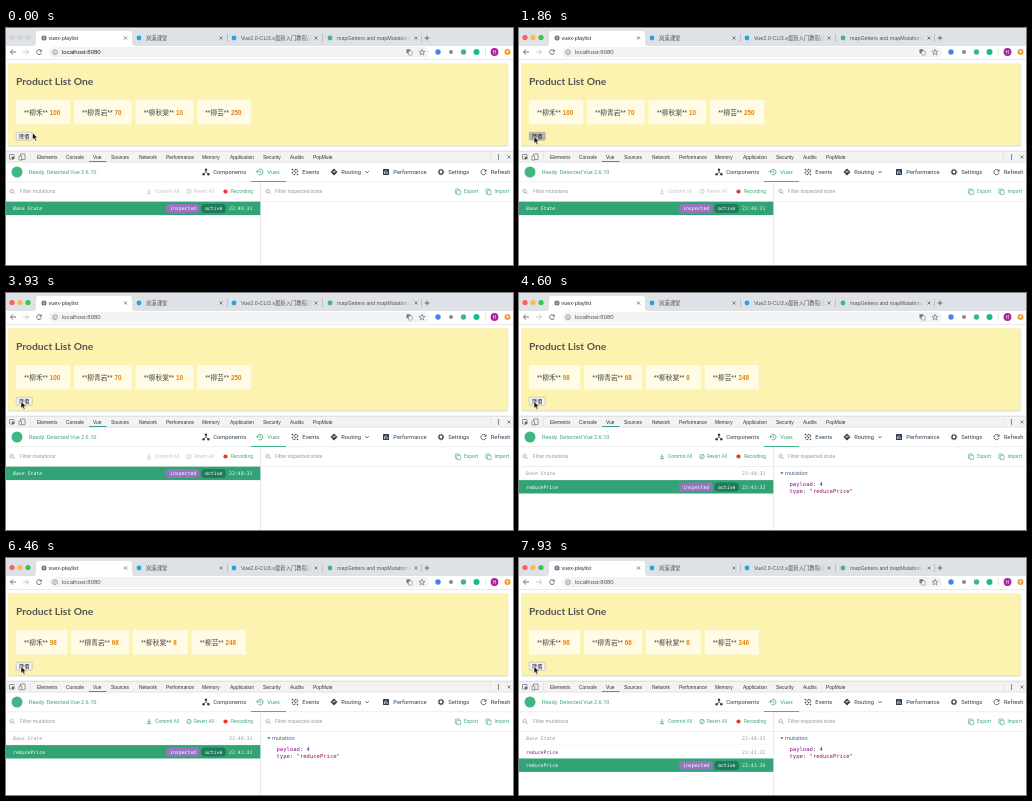
These frames come from a looping animation (507x237 px, 8 s). An HTML page:

```html
<!DOCTYPE html>
<html lang="en">
<head>
<meta charset="utf-8">
<title>Product list</title>
<style>
html, body { margin: 0; width: 100%; height: 100%; overflow: hidden; background: #fff; }
svg { display: block; width: 100%; height: 100%; }
text { white-space: pre; }
.ui { font-family: "Liberation Sans", "Noto Sans CJK SC", sans-serif; }
.dev { font-family: Roboto, sans-serif; }
.mono { font-family: "DejaVu Sans Mono", monospace; }
.head { font-family: Lato, sans-serif; font-weight: 700; }
</style>
</head>
<body>
<svg id="stage" viewBox="0 0 507 237" preserveAspectRatio="none">
  <defs>
    <linearGradient id="fade"><stop stop-color="#dee1e6" stop-opacity="0"/><stop offset="1" stop-color="#dee1e6"/></linearGradient>
    <filter id="shadow" x="-5%" y="-10%" width="110%" height="125%">
      <feDropShadow dx=".4" dy=".8" stdDeviation=".7" flood-opacity=".3"/>
    </filter>
  </defs>
  <g id="chrome"></g>
  <g id="page"></g>
  <g id="tools"></g>
  <g id="state"></g>
  <g id="button"></g>
  <path id="arrow" d="M0 0V7L1.6 5.5L2.8 8.2L4.1 7.6L2.9 5H5.1Z" fill="#111" stroke="#fff" stroke-width=".6"/>
  <path id="hand" d="M-.8 0Q0-.8.8 0V2.8L4 3.6Q4.8 4 4.5 5.2L3.8 7.8H-.7L-3 4.8Q-2.5 3.8-.8 5Z" fill="#fff" stroke="#111" stroke-width=".7"/>
</svg>
<script>
const $ = id => document.getElementById(id);
const GREEN = '#3ba776', INK = '#2c3e50', GREY = '#999';
const LOOP = 8000, COMMITS = [4000, 7670], PRESSES = [[1820, 1930], [5600, 5720]];
const PEOPLE = [['柳禾', 100], ['柳青岩', 70], ['柳秋棠', 10], ['柳芸', 250]];
const STAMPS = ['22:40:31', '22:41:32', '22:41:36'];

const text = (x, y, s, size, fill, cls = 'ui', more = '') =>
  `<text x="${x}" y="${y}" font-size="${size}" fill="${fill}" class="${cls}" ${more}>${s}</text>`;
const rect = (x, y, w, h, fill, r = 0, more = '') =>
  `<rect x="${x}" y="${y}" width="${w}" height="${h}" rx="${r}" fill="${fill}" ${more}/>`;
const dot = (x, y, r, fill, more = '') => `<circle cx="${x}" cy="${y}" r="${r}" fill="${fill}" ${more}/>`;
const line = (d, stroke, w = .7, x = 0, y = 0) =>
  `<path d="${d}" transform="translate(${x} ${y})" fill="none" stroke="${stroke}" stroke-width="${w}"/>`;
const cross = (x, y, r = 1.5) => line(`M${-r} ${-r}L${r} ${r}M${r} ${-r}L${-r} ${r}`, '#555', .7, x, y);
const dots = (x, y, fill) => [-2, 0, 2].map(d => dot(x, y + d, .65, fill)).join('');
const reload = (x, y, c, r = 2.4) =>
  line(`M${r * .8} ${-r * .6}A${r} ${r} 0 1 0 ${r} ${r * .3}M${r} ${-r}V${-r * .3}H${r * .3}`, c, .8, x, y);
const search = (x, y) => dot(x - .4, y - .4, 1.6, 'none', 'stroke="#888" stroke-width=".6"') + line('M.8 .8L2.5 2.5', '#888', .7, x, y);

// The window controls are pale until the window gets its first click.
function chrome(active) {
  const tabs = [[140, '岚溪课堂', 215], [235, 'Vue2.0-CLI3.x最新入门教程(基础)', 310], [331, 'mapGetters and mapMutations', 408]];
  const lights = active ? ['#fc605c', '#fdbc40', '#34c749'] : Array(3).fill('#d3d5d9');
  let s = rect(0, 0, 507, 18, '#dee1e6') + rect(0, 18, 507, 14, '#fff');
  lights.forEach((c, i) => s += dot(6 + 8 * i, 9.5, 2.6, c));
  s += '<path d="M27 18Q30 18 30 15V6Q30 3 33 3H123Q126 3 126 6V15Q126 18 129 18Z" fill="#fff"/>';
  s += dot(38, 10, 2.5, '#555') + line('M-2.4 0H2.4M0-2.4Q-2 0 0 2.4M0-2.4Q2 0 0 2.4', '#fff', .4, 38, 10);
  s += text(42.5, 12, 'vuex-playlist', 5.4, '#333') + cross(119.5, 10);
  tabs.forEach(([x, title, end], i) => {
    s += dot(x - 7, 10, 2.4, i < 2 ? '#25a4dd' : '#41b883');
    s += `<svg x="${x}" y="0" width="${end - x - 4 + (i > 1 ? 5 : 0)}" height="18">${text(0, 12, title, 5.35, '#555')}</svg>`;
    s += rect(end - 13, 4, 9, 11, i ? 'url(#fade)' : 'none');
    if (i < 2) s += cross(end, 10) + rect(end + 6.5, 6, .5, 8, '#9aa0a6');
  });
  s += rect(408, 4, 6, 11, '#dee1e6') + cross(410, 10) + rect(415, 6, .5, 8, '#9aa0a6') + line('M-2.4 0H2.4M0-2.4V2.4', '#555', .8, 421, 10);
  s += line('M3 0H-2.5M0-2.6L-2.6 0L0 2.6', '#555', .8, 7, 24) + line('M-3 0H2.5M0-2.6L2.6 0L0 2.6', '#b8bbc0', .8, 20, 24);
  s += reload(33, 24, '#555') + rect(43, 19, 380, 10.5, '#f1f3f4', 5.2);
  s += dot(49, 24.2, 2.3, 'none', 'stroke="#666" stroke-width=".6"') + line('M0-1.2V-.6M0-.2V1.3', '#666', .6, 49, 24.2);
  s += text(56, 26.3, 'localhost:8080', 6, active ? '#555' : '#222');
  s += rect(400.5, 21.2, 3.8, 4, '#777', .5) + rect(402.5, 23, 3.6, 4, '#fff', .5, 'stroke="#777" stroke-width=".6"');
  s += line('M0-3L.8-.9L3-.8L1.2.6L1.8 2.7L0 1.5L-1.8 2.7L-1.2.6L-3-.8L-.8-.9Z', '#666', .6, 416, 24.2);
  s += dot(432, 24, 2.7, '#4385e5') + dot(445, 24, 2, '#888');
  s += dot(457.5, 24, 2.7, '#41b883') + dot(470.5, 24, 3, '#18b98c') + rect(479, 20, .5, 8, '#ccc');
  s += dot(488.5, 24, 3.9, '#a8249a') + text(488.5, 25.7, 'H', 4.6, '#fff', 'ui', 'text-anchor="middle"');
  s += dot(501.5, 24, 3, '#f29a2e') + line('M0 1.7V-1.5M-1.3-.2L0-1.6L1.3-.2', '#fff', .7, 501.5, 24);
  return s + rect(0, 31.5, 507, .5, '#d5d5d5');
}

const page = () => rect(2, 35.3, 499.3, 82, '#fdf3b0', 0, 'filter="url(#shadow)"') +
  text(10, 57, 'Product List One', 10.3, '#555', 'head');

const ICONS = {
  Components: c => dot(0, -2.2, 1.2, c) + dot(-2.4, 2.2, 1.2, c) + dot(2.4, 2.2, 1.2, c) + line('M0-2V0L-2.4 2M0 0L2.4 2', c),
  Vuex: c => line('M-2.6 0A2.8 2.8 0 1 1-1.6 2.2M-4 -.8L-2.6.7L-1.2-.8M.2-1.5V.3L1.5 1', c, .8),
  Events: c => [0, 1, 2, 3].map(i => [0, 1, 2, 3].map(j => dot(-2.6 + i * 1.7, -2.6 + j * 1.7, (i + j) % 2 ? .3 : .75, c)).join('')).join(''),
  Routing: c => `<path d="M0-3.5L3.5 0L0 3.5L-3.5 0Z" fill="${c}"/>` + line('M-1 1V-.5H1.2M.5-1.3L1.4-.5L.5.3', '#fff', .6),
  Performance: c => rect(-3, -3, 6, 6, c, .5) + line('M-1.5 1.8V-.5M0 1.8V-1.8M1.5 1.8V.4', '#fff'),
  Settings: c => dot(0, 0, 2, 'none', `stroke="${c}" stroke-width="1.1"`) + dot(0, 0, 2.8, 'none', `stroke="${c}" stroke-width=".8" stroke-dasharray="1.1 1.1"`),
  Refresh: c => reload(0, 0, c, 2.6)
};

function tools() {
  const panels = { Elements: 31, Console: 60, Vue: 87, Sources: 105, Network: 133, Performance: 160, Memory: 196,
    Application: 224, Security: 257, Audits: 284, PopMute: 307 };
  const views = { Components: 200, Vuex: 254, Events: 289, Routing: 328, Performance: 380, Settings: 435, Refresh: 477.5 };
  let s = rect(0, 123, 507, 114, '#fff') + rect(0, 123, 507, 11, '#f3f3f3') + rect(0, 122.8, 507, .6, '#c8c8c8');
  s += rect(0, 133.8, 507, .5, '#ccc') + rect(83, 133, 17.5, 1, '#3c9aa8');
  s += rect(3.5, 126.5, 4.5, 4.5, 'none', .4, 'stroke="#555" stroke-width=".6"') + '<path d="M5.5 128.3L9 130L7.4 130.4L6.8 132Z" fill="#444"/>';
  s += rect(14.5, 126, 4.6, 5.6, 'none', .3, 'stroke="#555" stroke-width=".6"') + rect(13, 128, 2.6, 4, '#fff', .3, 'stroke="#555" stroke-width=".6"');
  s += rect(24, 125, .4, 8, '#ccc') + rect(484, 125, .4, 8, '#ccc') + dots(492.5, 129, '#555') + cross(503, 129);
  for (const [name, x] of Object.entries(panels)) s += text(x, 130.8, name, 4.9, '#333');

  s += dot(11, 144, 5.5, '#41b883') + text(23, 146.4, 'Ready. Detected Vue 2.6.10.', 5.55, GREEN, 'dev');
  for (const [name, x] of Object.entries(views)) {
    const c = name === 'Vuex' ? GREEN : INK;
    s += `<g transform="translate(${x} 144)">${ICONS[name](c)}</g>` + text(x + 7.3, 146.2, name, 5.75, c, 'dev');
  }
  s += line('M-1.7-.8L0 .9L1.7-.8', INK, .8, 361, 144);
  s += rect(0, 153.6, 507, .5, '#ddd') + rect(245, 153, 35, 1, '#41b883') + rect(0, 173.3, 507, .5, '#ddd') + rect(254, 154, .6, 83, '#ddd');
  s += search(6, 163.5) + text(14, 165.3, 'Filter mutations', 5.05, GREY, 'dev');
  s += search(262, 163.5) + text(269, 165.3, 'Filter inspected state', 5.05, GREY, 'dev');
  s += dot(219.5, 163.5, 2.1, '#e8352f') + text(225, 165.3, 'Recording', 4.9, GREEN, 'dev');
  for (const [x, name] of [[452, 'Export'], [482.5, 'Import']])
    s += rect(x - 2.6, 161, 3.8, 4.5, 'none', .4, `stroke="${GREEN}" stroke-width=".6"`) +
      rect(x - 1.2, 162.3, 3.8, 4.3, '#fff', .4, `stroke="${GREEN}" stroke-width=".6"`) + text(x + 6, 165.3, name, 4.9, GREEN, 'dev');
  return s;
}

function cards(step) {
  let x = 10;
  return PEOPLE.map(([name, price]) => {
    const value = String(price - 2 * step);
    const w = 33.2 + name.length * 6.3 + value.length * 2.75;
    const s = rect(x, 72, w, 24.5, '#fffbe4') +
      text(x + 8, 86.8, `**${name}** <tspan fill="#e8800c" font-weight="700" font-size="6.3">${value}</tspan>`, 6.7, '#444');
    x += w + 4;
    return s;
  }).join('');
}

function row(i, step) {
  const y = 173.7 + 13.4 * i, base = y + 8.5, on = i === step;
  const label = i ? 'reducePrice' : 'Base State';
  let s = on ? rect(0, y, 254.3, 13.4, '#31a374') : rect(0, y + 13, 254, .4, '#eee');
  s += text(7, base, label, 4.85, on ? '#fff' : i ? '#881391' : GREY, 'mono', i ? '' : 'font-style="italic"');
  if (on) s += rect(160, y + 2.4, 33.6, 9, '#9575bd', 3.5) + text(164, base, 'inspected', 4.85, '#fff', 'mono') +
    rect(195.3, y + 2.4, 24.5, 9, '#1f7b5a', 3.5) + text(199, base, 'active', 4.85, '#fff', 'mono');
  return s + text(223, base, STAMPS[i], 4.85, on ? '#e5f5ee' : GREY, 'mono');
}

function state(step) {
  const c = step ? GREEN : '#c4c4c4';
  let s = cards(step);
  s += line('M0-2.4V1M-1.4-.3L0 1.1L1.4-.3M-2 2.2H2', c, .8, 143, 163.5) + text(149, 165.3, 'Commit All', 4.9, c, 'dev');
  s += dot(183, 163.5, 2.2, 'none', `stroke="${c}" stroke-width=".7"`) + line('M-1.2 1.2L1.2-1.2', c, .7, 183, 163.5) +
    text(188, 165.3, 'Revert All', 4.7, c, 'dev');
  for (let i = 0; i <= step; i++) s += row(i, step);
  if (!step) return s;
  const pair = (y, key, value, color) => text(270.5, y, `${key}<tspan fill="#444">: </tspan><tspan fill="${color}">${value}</tspan>`, 5.55, '#881391', 'mono');
  return s + '<path d="M261.3 179.2H264.5L262.9 181.6Z" fill="#486887"/>' + text(266, 181.8, 'mutation', 5.7, '#486887', 'dev') +
    pair(192.7, 'payload', '4', '#0033cc') + pair(200.4, 'type', '"reducePrice"', '#98164a');
}

function button(down) {
  return rect(10.2, 104.2, 16, 8, down ? '#b4b4b4' : '#f3f3f3', .6, 'stroke="#a6a6a6" stroke-width=".5"') +
    text(18.2, 110, '降價', 5.1, '#222', 'ui', 'text-anchor="middle" lang="zh-Hant"');
}

const ease = u => u * u * (3 - 2 * u);
const span = (t, a, b) => ease(Math.min(1, Math.max(0, (t - a) / (b - a))));

function pointer(t) {
  const out = span(t, 60, 800), back = span(t, 1000, 1720);
  return [26.5 + 258 * out - 269.5 * back, 104.8 + 44.2 * out - 40.6 * back];
}

const shown = {};
function show(id, make, key) {
  if (shown[id] === key) return;
  shown[id] = key;
  $(id).innerHTML = make(key);
}

function draw(t) {
  show('chrome', chrome, t >= PRESSES[0][0]);
  show('state', state, COMMITS.filter(c => t >= c).length);
  show('button', button, PRESSES.some(([a, b]) => t >= a && t < b));

  const [x, y] = pointer(t), link = y > 135 && y < 154;
  for (const id of ['arrow', 'hand']) {
    $(id).setAttribute('transform', `translate(${x.toFixed(2)} ${y.toFixed(2)})`);
    $(id).setAttribute('visibility', (id === 'hand') === link ? 'visible' : 'hidden');
  }
}

$('page').innerHTML = page();
$('tools').innerHTML = tools();
const start = performance.now();
function tick() {
  draw((performance.now() - start) % LOOP);
  requestAnimationFrame(tick);
}
tick();
</script>
</body>
</html>
```
